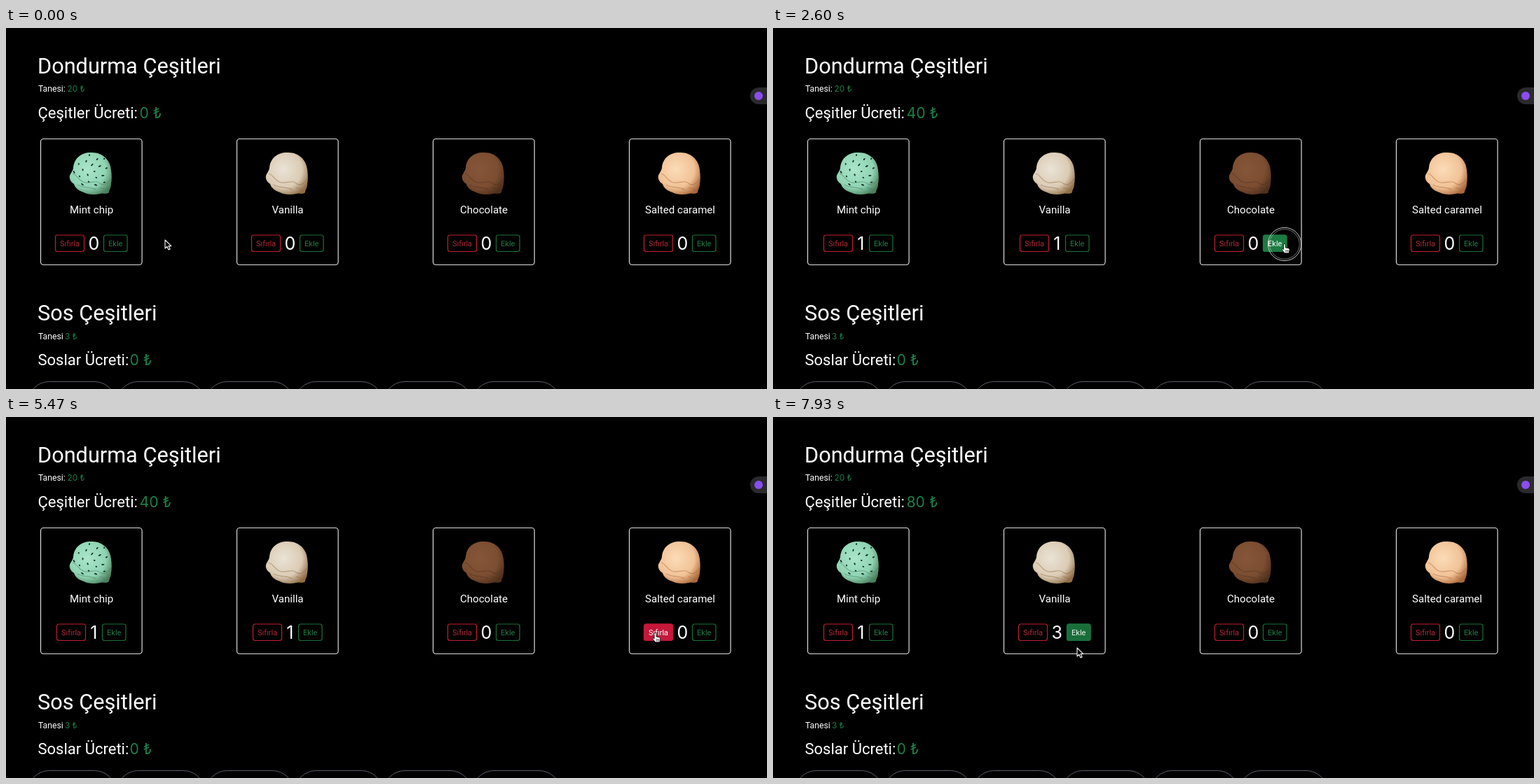
An HTML page that plays this animation: 1086 px wide and 516 px high, repeating every 8000 ms.

```html
<!DOCTYPE html>
<html lang="tr">
<head>
<meta charset="utf-8">
<title>Dondurma</title>
<style>
  html, body { margin: 0; width: 100%; height: 100%; overflow: hidden; background: #000; }
  svg { display: block; font-family: Roboto, Inter, sans-serif; fill: #fff; }
  .h1 { font-size: 30.7px; }
  .h3 { font-size: 22px; }
  .p { font-size: 12.2px; }
  .name { font-size: 15.1px; text-anchor: middle; }
  .count { font: 25px Inter, sans-serif; text-anchor: middle; }
  .btn { font-size: 11px; text-anchor: middle; }
  .price { fill: #1c7d48; font-family: Inter, sans-serif; }
  .h3.price { font-size: 21.2px; }
  .p.price { font-size: 11.8px; }
</style>
</head>
<body>
<svg id="stage" width="1086" height="516" viewBox="0 0 1086 516"></svg>
<script>
const LOOP = 8000;
const stage = document.getElementById('stage');

function add(parent, tag, attrs = {}, text) {
  const el = document.createElementNS('http://www.w3.org/2000/svg', tag);
  for (const k in attrs) el.setAttribute(k, attrs[k]);
  if (text !== undefined) el.textContent = text;
  parent.appendChild(el);
  return el;
}
const label = (cls, x, y, text, parent = stage) => add(parent, 'text', { class: cls, x, y }, text);
const smooth = p => p * p * (3 - 2 * p);

// Headings
label('h1', 45, 64.7, 'Dondurma Çeşitleri');
label('p', 46, 91.3, 'Tanesi:');
label('p price', 87.5, 91.3, '20 ₺');
label('h3', 45.5, 129, 'Çeşitler Ücreti:');
const total = label('h3 price', 190.5, 129, '0 ₺');
label('h1', 45, 418, 'Sos Çeşitleri');
label('p', 46, 444.5, 'Tanesi');
label('p price', 84, 444.5, '3 ₺');
label('h3', 45.5, 482, 'Soslar Ücreti:');
label('h3 price', 176.5, 482, '0 ₺');

// Sauce cards cut off by the lower edge
for (let i = 0; i < 6; i++) {
  add(stage, 'rect', { x: 31.5 + 126.9 * i, y: 505.5, width: 125, height: 80, rx: 30, fill: 'none', stroke: '#5c5a68' });
}

// Side tab
add(stage, 'path', { d: 'M1086 85H1074a12 12 0 0 0 0 24H1086Z', fill: '#2a2a2d' });
add(stage, 'circle', { cx: 1074, cy: 97, r: 6, fill: '#8b4df0' });

// Ice cream cards
const SCOOP = 'M-31 34C-29 29-27 28-26 23C-25 8-13 0 1 1C16 1 27 12 28 26C29 33 29 40 28 46' +
  'C28 52 25 54 25 58C20 62 16 58 12 60C4 62-6 61-11 58C-18 56-24 51-25 46C-30 43-32 38-31 34Z';
const FLAVORS = [
  ['Mint chip', '#aae6cb', '#8fd4b3', '#4b7f5c'],
  ['Vanilla', '#ebe3d6', '#dacbb4', '#8f6d45'],
  ['Chocolate', '#85563a', '#7b4d31', '#50301c'],
  ['Salted caramel', '#fbdcb8', '#f1c296', '#a9683a']
];
const RED = { edge: '#c01f2e', text: '#b02a38', fill: '#c5183a' };
const GREEN = { edge: '#1b7238', text: '#1f7a46', fill: '#1b7b40' };
const defs = add(stage, 'defs');

function button(card, x, w, text, color) {
  const g = add(card, 'g');
  add(g, 'rect', { x, y: 296, width: w, height: 23.5, rx: 3, fill: 'none', stroke: color.edge, 'stroke-width': 1.2 });
  const fill = add(g, 'rect', { x: x - .5, y: 295.5, width: w + 1, height: 24.5, rx: 3.5, fill: color.fill });
  label('btn', x + w / 2, 311.8, text, g).setAttribute('fill', color.text);
  const lit = label('btn', x + w / 2, 311.8, text, g);
  return { g, fill, lit, x, w };
}

function scoop(card, i, [, light, mid, dark]) {
  const grad = add(defs, 'radialGradient', { id: 'tone' + i, cx: .42, cy: .4, r: .68 });
  [[0, light], [.65, mid], [1, dark]].forEach(([offset, color]) =>
    add(grad, 'stop', { offset, 'stop-color': color }));
  const g = add(card, 'g', { transform: 'translate(0 177)' });
  add(g, 'path', { d: SCOOP, fill: `url(#tone${i})` });
  add(g, 'path', {
    d: 'M-27 31C-20 33-18 43-9 44S6 40 12 45S25 44 28 38M-20 47C-10 53-2 49 6 54M12 51L20 54',
    fill: 'none', stroke: dark, 'stroke-width': 1.2, opacity: .5
  });
  if (i) return;
  for (let k = 0; k < 19; k++) {
    const a = k * 2.4, r = 26 * Math.sqrt((k + .5) / 19);
    const x = r * Math.cos(a), y = 28 + r * Math.sin(a);
    add(g, 'ellipse', {
      rx: 1.4 + k % 3 * .4, ry: 1, fill: '#18352c',
      transform: `translate(${x} ${y}) rotate(${k * 67})`
    });
  }
}

const cards = FLAVORS.map((flavor, i) => {
  const cx = 122 + 280 * i;
  const g = add(stage, 'g', { transform: `translate(${cx} 0)` });
  add(g, 'rect', { x: -72.5, y: 158.5, width: 144.6, height: 180, rx: 4, fill: 'none', stroke: '#dcdcdc', 'stroke-width': 1.2 });
  scoop(g, i, flavor);
  label('name', 0, 265.2, flavor[0], g);
  return {
    cx,
    count: label('count', 3.3, 317, '0', g),
    reset: button(g, -51.5, 41, 'Sıfırla', RED),
    plus: button(g, 17.5, 33.5, 'Ekle', GREEN)
  };
});

// Pointer
const ring = add(stage, 'g', { fill: 'none', stroke: '#c4c4c4' });
add(ring, 'circle', { r: 23.7 });
add(ring, 'circle', { r: 21.3, 'stroke-width': .8, opacity: .7 });
const arrow = add(stage, 'path', {
  d: 'M0 0V12L2.9 9.4L5 14L7.1 13L5 8.6H8.8Z',
  fill: '#000', stroke: '#fff', 'stroke-width': 1.1, 'stroke-linejoin': 'round'
});
const hand = add(stage, 'g', { fill: '#fff', stroke: '#111', 'stroke-width': .9, 'stroke-linejoin': 'round' });
add(hand, 'path', { d: 'M-1.5 1a1.5 1.5 0 0 1 3 0V5l4 .8q1.9.5 1.7 2.2l-.9 4.8H0L-3.8 8q-.2-1.7 1.4-1.2l.9.9Z' });
add(hand, 'path', { d: 'M1.7 8.2v3M3.4 8.2v3M5.1 8.2v3', 'stroke-width': .7 });

// time, x, y, 1 = steady speed on the way there
const PATH = [
  [0, 227, 303], [70, 227, 303], [460, 156, 309], [740, 156, 309],
  [1200, 442, 279], [1400, 436, 309], [1740, 436, 309],
  [2350, 729, 309], [2600, 730, 309], [2740, 730, 309],
  [3080, 648, 311], [4530, 648, 311], [4730, 934, 304, 1],
  [4930, 940, 309], [5420, 940, 309], [5980, 367, 312], [6560, 367, 312],
  [6820, 436, 309], [7900, 436, 309], [7930, 434, 330, 1], [LOOP, 434, 330]
];
// time, card, adds one or resets
const CLICKS = [
  [580, 0, 1], [1540, 1, 1], [2600, 2, 1], [3880, 2, 0],
  [6420, 1, 0], [7000, 1, 1], [7280, 1, 1], [7560, 1, 1]
];
const LAG = 70;

function pointer(t) {
  const n = Math.max(1, PATH.findIndex(k => k[0] >= t));
  const [t0, x0, y0] = PATH[n - 1], [t1, x1, y1, steady] = PATH[n];
  const p = Math.min(1, Math.max(0, (t - t0) / (t1 - t0)));
  const e = steady ? p : smooth(p);
  return [x0 + (x1 - x0) * e, y0 + (y1 - y0) * e];
}

function countsAt(t) {
  const c = [0, 0, 0, 0];
  for (const [at, i, plus] of CLICKS) if (t >= at + LAG) c[i] = plus ? c[i] + 1 : 0;
  return c;
}

function inside(card, b, [x, y]) {
  const left = card.cx + b.x;
  return x >= left && x <= left + b.w && y >= 296 && y <= 320;
}

// Eased 150 ms colour fade from the recent hover state
function hover(card, b, t) {
  let sum = 0;
  for (let k = 0; k < 10; k++) sum += inside(card, b, pointer(Math.max(0, t - k * 15)));
  return smooth(sum / 10);
}

function draw(t) {
  const pos = pointer(t), counts = countsAt(t);
  let over = false;
  total.textContent = counts.reduce((a, b) => a + b) * 20 + ' ₺';
  cards.forEach((card, i) => {
    const shift = counts[i] === 1 ? 2 : 0;
    card.count.textContent = counts[i];
    card.reset.g.setAttribute('transform', `translate(${shift} 0)`);
    card.plus.g.setAttribute('transform', `translate(${-shift} 0)`);
    for (const b of [card.reset, card.plus]) {
      const h = hover(card, b, t);
      b.fill.setAttribute('opacity', h);
      b.lit.setAttribute('opacity', h);
      over = over || inside(card, b, pos);
    }
  });
  const place = `translate(${pos[0]} ${pos[1]})`;
  for (const el of [ring, arrow, hand]) el.setAttribute('transform', place);
  const pressed = CLICKS.some(([at]) => t >= at - LAG && t < at + 2 * LAG);
  ring.setAttribute('visibility', pressed ? 'visible' : 'hidden');
  hand.setAttribute('visibility', over ? 'visible' : 'hidden');
  arrow.setAttribute('visibility', over ? 'hidden' : 'visible');
}

const start = performance.now();
function tick() {
  draw((performance.now() - start) % LOOP);
  requestAnimationFrame(tick);
}
tick();
</script>
</body>
</html>
```
